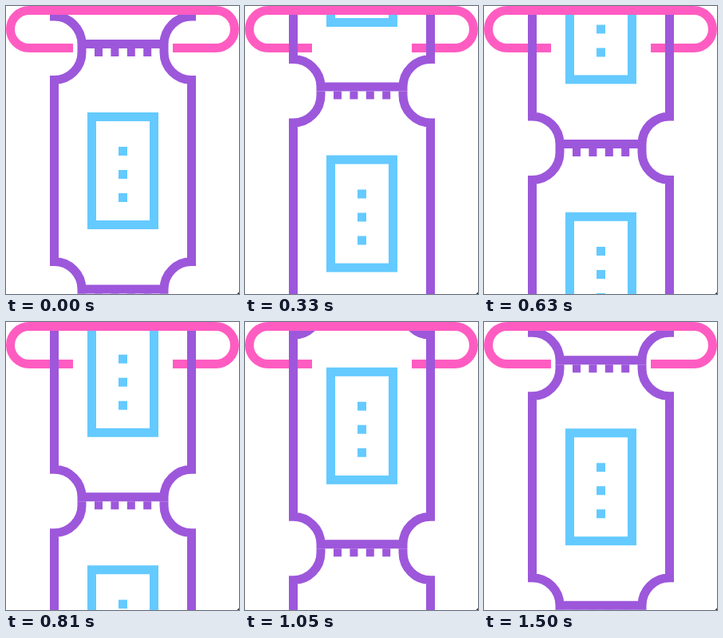
Animation of 292 by 360 pixels, one loop 1590 ms. Source, as an HTML page:

```html
<!DOCTYPE html>
<html lang="en">
<head>
<meta charset="utf-8">
<title>Ticket printer</title>
<style>
  html, body { margin: 0; width: 100%; height: 100%; overflow: hidden; background: #fff; }
  svg { display: block; width: 292px; height: 360px; }
</style>
</head>
<body>
<svg viewBox="0 0 292 360" fill="none" stroke-width="11">
  <defs>
    <clipPath id="slot"><rect y="11" width="292" height="349"/></clipPath>
    <g id="ticket">
      <path stroke="#9d57db" d="M95 11V16A34.5 34.5 0 0 1 60.5 50.5V277.5A34.5 34.5 0 0 1 95 312H198A34.5 34.5 0 0 1 232.5 277.5V50.5A34.5 34.5 0 0 1 198 16V11"/>
      <path stroke="#9d57db" stroke-width="10" stroke-dasharray="10 10.4" d="M111 16H183"/>
      <rect stroke="#64caff" x="107.5" y="96.5" width="78" height="135"/>
      <path stroke="#64caff" stroke-dasharray="11 18" d="M146.5 134V204"/>
    </g>
  </defs>
  <path stroke="#ff5cc2" d="M84 52.5H29A23.5 23.5 0 0 1 29 5.5H263A23.5 23.5 0 0 1 263 52.5H209"/>
  <g clip-path="url(#slot)">
    <g id="strip">
      <use href="#ticket" y="-613"/>
      <use href="#ticket" y="-306.5"/>
      <use href="#ticket"/>
      <use href="#ticket" y="306.5"/>
    </g>
  </g>
  <path fill="#333" d="M292 357.5V360H289.5Z"/>
</svg>
<script>
  const LOOP = 1590, STEP = 30, LAST = 50, START = 42;
  const PEAK = 24.5, SPEED = 7.755, DRAG = 0.00259;
  const strip = document.getElementById('strip');

  // Feed speed is a parabola over the steps, so distance is a cubic.
  const feed = i => SPEED * i - DRAG * ((i - PEAK) ** 3 + PEAK ** 3);

  function draw() {
    const t = performance.now() % LOOP;
    const i = Math.min(LAST, Math.floor(t / STEP));
    strip.setAttribute('transform', `translate(0 ${START + feed(i)})`);
    requestAnimationFrame(draw);
  }
  draw();
</script>
</body>
</html>
```
